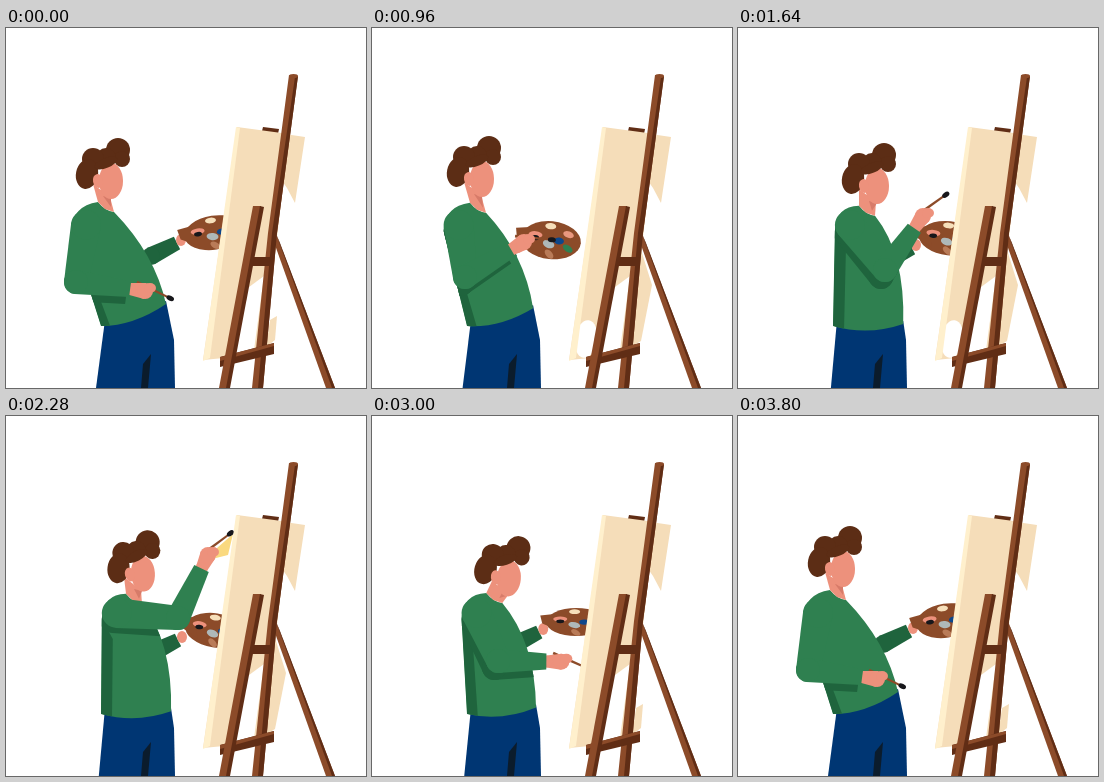
An HTML page with a canvas for the animation above (3840 ms loop, 360x360 px).

```html
<!DOCTYPE html>
<html lang="en">
<head>
<meta charset="utf-8">
<title>Painter at the easel</title>
<style>
html, body { margin: 0; width: 100%; height: 100%; overflow: hidden; background: #fff; }
canvas { display: block; width: 360px; height: 360px; }
</style>
</head>
<body>
<canvas id="stage" width="360" height="360"></canvas>
<script>
const ctx = document.getElementById('stage').getContext('2d');
const LOOP = 3840, STEP = 40;
const GREEN = '#2f8050', SHADE = '#1f643d', SKIN = '#ed917c', HAIR = '#5c2d15',
  JEANS = '#003673', WOOD = '#8c4b29', DARK_WOOD = '#602d15', CREAM = '#f5ddb9',
  EDGE = '#fff0cd', INK = '#17171b';

// neck: x of the neck, which sets the lean of the body.
// head and palette: x, y, turn (and flattening of the palette).
const rest = { neck: [100], head: [100, 140, 0], elbow: [70, 254], hand: [139, 263], brush: [.45], palette: [206, 205, -.15, .9] };
const dip = { neck: [106], head: [105, 138, 0], elbow: [93, 249], hand: [152, 214], brush: [.1], palette: [177, 212, .1, 1] };
const lift = { neck: [129], head: [134, 145, 0], elbow: [147, 242], hand: [185, 188], brush: [-.62], palette: [209, 210, .1, .9] };
const reach = { neck: [128], head: [131, 145, -.07], elbow: [172, 202], hand: [202, 139], brush: [-.64], palette: [207, 214, .15, .9] };
const low = { neck: [129], head: [142, 151, .1], elbow: [151, 240], hand: [211, 228], brush: [.2], palette: [205, 210, 0, .7] };
const lower = { neck: [112], head: [119, 146, .06], elbow: [88, 253], hand: [156, 273], brush: [.75], palette: [198, 200, 0, .8] };
const keys = [[0, rest], [680, dip], [1080, dip], [1640, lift], [2160, reach], [2280, reach],
  [2680, low], [2760, low], [3320, lower], [3760, rest], [LOOP, rest]];

function poseAt(t) {
  const i = keys.findLastIndex(key => t >= key[0]);
  const [t0, a] = keys[i], [t1, b] = keys[i + 1];
  const u = (t - t0) / (t1 - t0), k = u * u * (3 - 2 * u), pose = {};
  for (const part in a) pose[part] = a[part].map((v, n) => v + (b[part][n] - v) * k);
  return pose;
}

function poly(color, ...p) {
  ctx.beginPath();
  for (let i = 0; i < p.length; i += 2) ctx.lineTo(p[i], p[i + 1]);
  ctx.fillStyle = color;
  ctx.fill();
}

function oval(color, x, y, rx, ry = rx, a = 0) {
  ctx.beginPath();
  ctx.ellipse(x, y, rx, ry, a, 0, 7);
  ctx.fillStyle = color;
  ctx.fill();
}

function limb(color, [x1, y1], r1, [x2, y2], r2, flatEnd) {
  const a = Math.atan2(y2 - y1, x2 - x1), c = Math.cos(a), s = Math.sin(a);
  poly(color, x1 - s * r1, y1 + c * r1, x2 - s * r2, y2 + c * r2,
    x2 + s * r2, y2 - c * r2, x1 + s * r1, y1 - c * r1);
  oval(color, x1, y1, r1);
  if (!flatEnd) oval(color, x2, y2, r2);
}

function placed(x, y, angle, draw) {
  ctx.save();
  ctx.translate(x, y);
  ctx.rotate(angle);
  draw();
  ctx.restore();
}

function drawPalette(flatness) {
  ctx.scale(1, flatness);
  oval(WOOD, 2, 0, 30, 19);
  poly(WOOD, -34, -9, -20, -11, -14, 12, -32, 2);
  ['#f6dfba', '#e9987f', GREEN, '#b97b58'].forEach((color, i) => {
    const a = -1.6 + i * 1.05;
    oval(color, 1 + 21 * Math.cos(a), 14 * Math.sin(a), 5.5, 3.2, i / 4);
  });
  oval('#0d478b', 10, 0, 5, 3.5);
  oval('#aeb8b9', 0, 4, 6, 4, .3);
  oval(SKIN, -14, -4, 7, 3.5);
  oval(INK, -14, -1, 4, 2.5);
}

function drawHead() {
  oval(HAIR, 12, -18, 12);
  oval(HAIR, 16, -9, 8);
  oval(HAIR, 0, -10, 10);
  oval(HAIR, -13, -9, 11);
  oval(HAIR, -19, 6, 11, 15, .2);
  oval(SKIN, 5, 13, 12, 18);
  oval(SKIN, -8, 13, 5, 7, -.2);
  oval(HAIR, 0, -5, 12, 5, -.4);
}

function drawBrush() {
  poly(WOOD, -9, -1.4, 26, -1, 26, 1, -9, 1.4);
  oval(INK, 28, 0, 4, 2.5);
}

function torsoPath(neck, neckY, shoulder, left, right) {
  const bulge = right[0] + 18 - .56 * (right[0] - neck - 8);
  ctx.beginPath();
  ctx.moveTo(neck - 8, neckY - 5);
  ctx.quadraticCurveTo(neck - 1, neckY + 4, neck + 8, neckY + 5);
  ctx.quadraticCurveTo(bulge, 226, ...right);
  ctx.quadraticCurveTo((left[0] + right[0]) / 2, (left[1] + right[1]) / 2 + 11, ...left);
  ctx.lineTo(shoulder[0] - 15, shoulder[1] + 6);
  ctx.quadraticCurveTo(shoulder[0] - 14, shoulder[1] - 19, neck - 8, neckY - 5);
}

function drawPerson({ neck: [neck], head, elbow, hand, brush, palette }, t) {
  const lean = neck - 100, neckY = 179 + .13 * lean;
  const shoulder = [80 + 1.1 * lean, 197];
  const left = [95, 298], right = [160 + .18 * lean, 276 + .69 * lean];
  const reachX = hand[0] - elbow[0], reachY = hand[1] - elbow[1];
  const k = 1 - 15 / Math.hypot(reachX, reachY);
  const wrist = [elbow[0] + reachX * k, elbow[1] + reachY * k];
  const farWrist = [palette[0] - 35, palette[1] + 10];

  poly(JEANS, left[0] + 4, left[1] - 6, right[0], right[1] - 3, 168, 312, 169, 360, 90 + lean * .1, 360);
  poly('#0b1c2c', 145, 326, 137, 336, 135, 360, 142, 360);

  limb(SHADE, [farWrist[0] - 26, farWrist[1] + 13], 9, farWrist, 7, true);
  oval(SKIN, farWrist[0] + 4, farWrist[1] - 3, 5, 6);
  placed(...palette.slice(0, 3), () => drawPalette(palette[3]));

  // The arm casts its shade on the body.
  ctx.save();
  torsoPath(neck, neckY, shoulder, left, right);
  ctx.fillStyle = GREEN;
  ctx.fill();
  ctx.clip();
  poly(SHADE, ...left, left[0] + 11, left[1] + 5, shoulder[0] - 4, shoulder[1] + 26, shoulder[0] - 15, shoulder[1] + 6);
  ctx.translate(-4, 7);
  limb(SHADE, shoulder, 13, elbow, 12);
  limb(SHADE, elbow, 12, wrist, 8, true);
  ctx.restore();

  const [hx, hy] = head;
  poly(SKIN, hx - 13, hy + 16, hx + 4, hy + 29, neck + 8, neckY + 5, neck - 1, neckY + 2, neck - 8, neckY - 5);
  poly('#d77b69', hx - 3, hy + 28, hx + 5, hy + 30, neck + 5, neckY);
  placed(...head, drawHead);

  const [x, y] = hand;
  if (t >= 2040 && t < 2440) poly('#fad97f', x + 1, y, x + 25, y - 21, x + 20, y, x + 8, y + 3);
  placed(x, y - 5, brush[0], drawBrush);
  limb(SKIN, wrist, 6, hand, 8);
  oval(SKIN, x + 5, y - 3, 6, 5);
  limb(GREEN, shoulder, 15, elbow, 12);
  limb(GREEN, elbow, 12, wrist, 8, true);
}

function drawEasel(t) {
  const gap = t >= 3040 && t < 3560;
  poly(DARK_WOOD, 257, 99, 273, 101, 272, 106, 256, 103);
  poly(CREAM, 231, 99, 283, 106, 258, 321, 218, 330, 197, 332);
  if (t >= 640 && t < 1960) oval('#fff', 214, 311, 11, 19, .15);
  if (gap) oval('#fff', 221, 302, 14, 31, .25);
  poly(EDGE, 230, 99, 234, 100, 204, 330, 197, 333);
  poly('#fff', 239, 262, 258, 248, 248, 322, 228, 326);
  poly(CREAM, 272, 105, 299, 109, 289, 175, 281, 160, 274, 150);
  if (t >= 640 && t < 3000) poly(CREAM, 264, 215, 270, 225, 280, 257, 269, 313, 259, 319);
  else poly(CREAM, 264, 292, 271, 288, 269, 312, 260, 319);

  poly(WOOD, 264, 203, 271, 208, 329, 360, 320, 360);
  poly(DARK_WOOD, 270, 206, 274, 215, 329, 360, 326, 360);
  poly(WOOD, 283, 47, 292, 48, 271, 205, 257, 360, 246, 360, 262, 205);
  poly(DARK_WOOD, 289, 49, 292, 48, 271, 205, 257, 360, 252, 360, 266, 205);
  oval(WOOD, 287.5, 48, 4.5, 2);
  poly(DARK_WOOD, 244, 229, 268, 229, 267, 238, 243, 238);
  if (gap) oval('#fff', 273, 133, 2, 7);

  poly(DARK_WOOD, 214, 329, 268, 315, 268, 326, 214, 339);
  poly(WOOD, 214, 329, 268, 315, 268, 318, 214, 333);
  poly(WOOD, 247, 178, 255, 178, 221, 360, 213, 360);
  poly(DARK_WOOD, 254, 178, 258, 179, 224, 360, 220, 360);
}

const start = performance.now();
function frame() {
  const elapsed = performance.now() - start;
  const t = Math.floor((elapsed % LOOP) / STEP) * STEP;
  ctx.fillStyle = '#fff';
  ctx.fillRect(0, 0, 360, 360);
  drawPerson(poseAt(t), t);
  drawEasel(t);
  requestAnimationFrame(frame);
}
frame();
</script>
</body>
</html>
```
